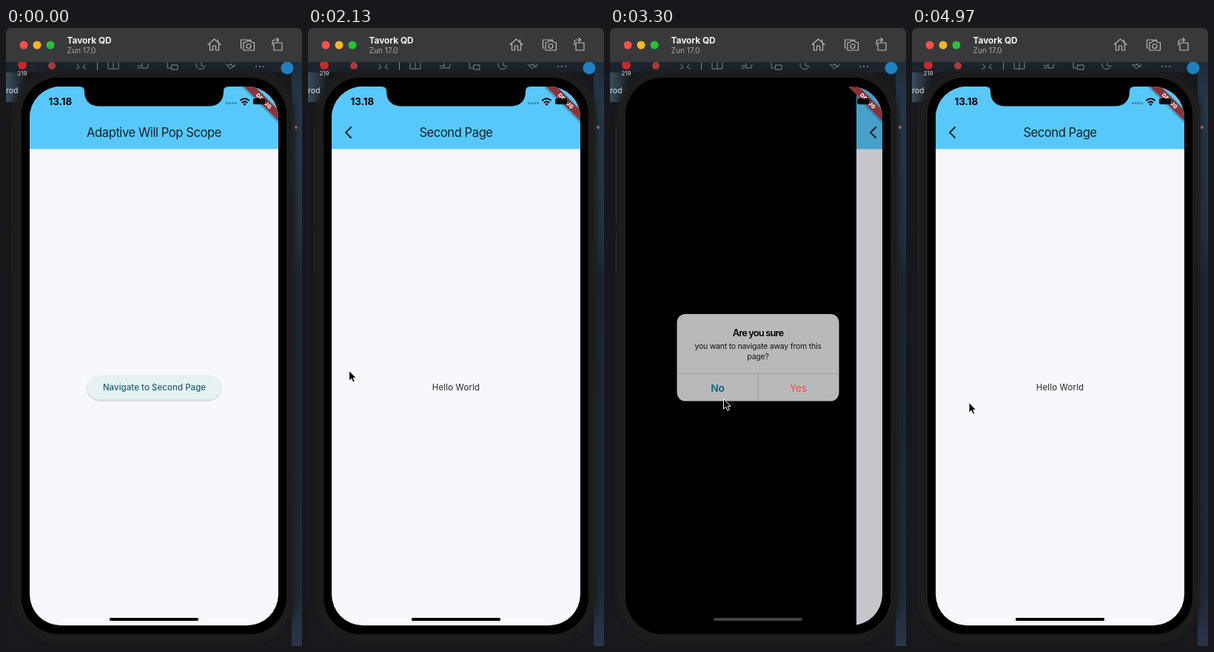
Animation of 400 by 834 pixels, one loop 5.01 s. Source, as an HTML page:

```html
<!DOCTYPE html>
<html lang="en">
<head>
<meta charset="utf-8">
<title>Second page back swipe</title>
<style>
  html, body { margin: 0; width: 100%; height: 100%; overflow: hidden; background: #17191c; }
  svg { display: block; width: 100vw; height: 100vh; font-family: Inter, "Open Sans", sans-serif; }
  .mid { text-anchor: middle; }
  .title { font-size: 16.6px; letter-spacing: -.45px; fill: #15222a; }
  .line { fill: none; stroke-linecap: round; stroke-linejoin: round; }
  .page { fill: #f7f8fc; }
  .bar { fill: #58c8fb; }
</style>
</head>
<body>
<svg viewBox="0 0 400 834">
  <defs>
    <clipPath id="screen"><rect x="32" y="79" width="336" height="727.200" rx="42"/></clipPath>
    <linearGradient id="rightEdge" x2="0" y2="1">
      <stop offset="0" stop-color="#1d2b38"/>
      <stop offset=".08" stop-color="#24394c"/>
      <stop offset=".3" stop-color="#223244"/>
      <stop offset=".37" stop-color="#1a2633"/>
      <stop offset=".9" stop-color="#1c2a38"/>
      <stop offset="1" stop-color="#2a3547"/>
    </linearGradient>
    <linearGradient id="leftEdge" x2="1" y2="0">
      <stop offset="0" stop-color="#3a4d5c"/>
      <stop offset="1" stop-color="#1a1e22"/>
    </linearGradient>
    <filter id="soft" x="-20%" y="-20%" width="140%" height="140%"><feGaussianBlur stdDeviation="3"/></filter>
    <filter id="lift" x="-10%" y="-20%" width="120%" height="160%">
      <feDropShadow dx="0" dy="1" stdDeviation=".8" flood-opacity=".3"/>
    </filter>
  </defs>

  <!-- desktop behind the simulator -->
  <rect width="400" height="834" fill="#17191c"/>
  <rect y="44" width="400" height="16" fill="#1b232c"/>
  <rect y="60" width="26" height="40" fill="url(#leftEdge)"/>
  <rect x="386" y="44" width="14" height="790" fill="url(#rightEdge)"/>
  <path d="M8.500 135V264M8.500 276V330" stroke="#2b2d30"/>
  <rect x="9" y="57" width="382" height="772" rx="60" fill="#1a1a1d" filter="url(#soft)"/>
  <circle cx="22" cy="50" r="6" fill="#c8282c"/>
  <circle cx="62" cy="51" r="5" fill="#a93a3c"/>
  <circle cx="380" cy="54" r="8.500" fill="#1f7fc0"/>
  <circle cx="392" cy="134" r="2.200" fill="#a0545a"/>
  <text class="mid" x="22" y="64" font-size="8" fill="#d4d6d8">219</text>
  <text y="88" font-size="10.500" fill="#dfe3e6">rod</text>
  <g class="line" stroke="#85888c">
    <path d="M95 55l4-2-3-4M108 55l-4-2 3-4M123.500 46v10M138 47v8h6l1 1 1-1h6v-8M145 47v7M178 51h5M178 54h4M184 48v6h7l1-5M218 47v7h4M224 50h8v6h-8zM257 48a6 6 0 0 0 12 3M264 47v4h3M297 49l6 6 7-6M299 50h4l1-2 2 4h3"/>
    <path d="M338 52h.1M343 52h.1M348 52h.1" stroke-width="2"/>
  </g>

  <!-- window title bar -->
  <path d="M0 46V8Q0 0 8 0H392Q400 0 400 8V46Z" fill="#39393c"/>
  <circle cx="24" cy="23" r="5.500" fill="#fb5149"/>
  <circle cx="42" cy="23" r="5.500" fill="#fdb524"/>
  <circle cx="60" cy="23" r="5.500" fill="#25c138"/>
  <text x="82.500" y="21" font-size="11.800" font-weight="700" fill="#f2f2f4">Tavork QD</text>
  <text x="82.500" y="34" font-size="10.200" fill="#a9a9ad">Zun 17.0</text>
  <g class="line" stroke="#b9b9bd" stroke-width="1.200">
    <path d="M273 22.500L281.500 15l8.500 7.500M275.500 21v9h4v-6h4v6h4v-9M286.500 16v3"/>
    <path d="M319 27h-1.500V16h13v2M321 19.500h3l1.500-2h5l1.500 2h3.500V30H321z"/>
    <circle cx="328" cy="24.500" r="3"/>
    <path d="M362 20h11v10h-11zM360 23v-4q0-3 3-3h5M366 13.500l2.500 2.500-2.500 2.500"/>
  </g>

  <!-- phone -->
  <rect x="21" y="67" width="358" height="751" rx="50"/>
  <g clip-path="url(#screen)">
    <rect x="32" y="79" width="336" height="728"/>
    <g id="first">
      <rect class="page" x="32" y="79" width="336" height="728"/>
      <rect class="bar" x="32" y="79" width="336" height="84.400"/>
      <text class="mid title" x="200" y="147">Adaptive Will Pop Scope</text>
      <rect x="110" y="469" width="180" height="32.500" rx="16.250" fill="#e6f1f4" filter="url(#lift)"/>
      <text class="mid" x="200.500" y="489" font-size="11.400" font-weight="500" letter-spacing=".1" fill="#1f6074">Navigate to Second Page</text>
    </g>
    <g id="second">
      <rect class="page" x="32" y="79" width="336" height="728"/>
      <rect class="bar" x="32" y="79" width="336" height="84.400"/>
      <path class="line" d="M58 134l-7 7 7 7" stroke="#10222b" stroke-width="2"/>
      <text class="mid title" x="200" y="147">Second Page</text>
      <text class="mid" x="200" y="489" font-size="11.400" letter-spacing=".2" fill="#242528">Hello World</text>
    </g>
    <rect id="barrier" x="32" y="79" width="336" height="728"/>
    <g id="dialog">
      <rect x="90.500" y="386" width="219" height="117.500" rx="11.500" fill="#b9b9bb"/>
      <path d="M90.500 466.500H309.500M200 466.500V503.500" stroke="#929294" stroke-width=".8"/>
      <g class="mid">
        <text x="200" y="416" font-size="12.800" font-weight="600" letter-spacing="-.8">Are you sure</text>
        <g font-size="10.500" letter-spacing="-.22" fill="#151517">
          <text x="200" y="433">you want to navigate away from this</text>
          <text x="200" y="447">page?</text>
        </g>
        <text x="145.500" y="490.500" font-size="13.600" font-weight="600" fill="#0f6478">No</text>
        <text x="254.500" y="490.500" font-size="13.400" fill="#f54b3c">Yes</text>
      </g>
    </g>
    <g transform="translate(348.500 98.500) rotate(45)">
      <rect x="-40" y="-4" width="80" height="10" fill="#000" opacity=".45" filter="url(#soft)"/>
      <rect x="-40" y="-5" width="80" height="10" fill="#8b3338"/>
      <text class="mid" y="2.700" font-size="7.200" font-weight="800" letter-spacing=".3" fill="#fff">DEBUG</text>
    </g>
  </g>

  <!-- status bar, notch and home indicator -->
  <path d="M99 79Q106 79 106 85Q106 105.500 127 105.500H273Q294 105.500 294 85Q294 79 301 79Z"/>
  <text x="57.500" y="104" font-size="13.300" font-weight="700">13.18</text>
  <path d="M297 101.500h3m1 0h3m1 0h3m1 0h3" stroke="#000" stroke-opacity=".28" stroke-width="3"/>
  <g class="line" stroke="#000" stroke-width="2">
    <path d="M317 97.500q5.500-4.500 11 0M319.500 100.500q3-2.500 6 0"/>
    <circle cx="322.500" cy="103" r=".6"/>
  </g>
  <rect x="334" y="95" width="16.500" height="8" rx="2.200"/>
  <rect x="351.300" y="97.500" width="1.200" height="3"/>
  <rect x="140" y="796" width="120" height="4" rx="2" fill="#414144"/>
  <clipPath id="onPage"><rect id="pageArea" y="790" width="336" height="17"/></clipPath>
  <rect x="140" y="796" width="120" height="4" rx="2" clip-path="url(#onPage)"/>

  <path id="cursor" d="M0 0V13.500L3.200 10.700 5.400 15.600 7.800 14.500 5.600 9.800H9.700Z" stroke="#fafafa" stroke-linejoin="round"/>
</svg>
<script>
const LOOP = 5010, STEP = 100 / 3, WIDTH = 336, DRAGGED = 301;
const el = id => document.getElementById(id);
const [first, second, barrier, dialog, pageArea, cursor] =
  ["first", "second", "barrier", "dialog", "pageArea", "cursor"].map(el);

const progress = (t, from, to) => Math.min(1, Math.max(0, (t - from) / (to - from)));
const smooth = u => u * u * (3 - 2 * u);
const easeOut = u => 1 - (1 - u) ** 3;

// each key: [time, ...values]
function track(keys, t, ease) {
  const i = keys.findIndex(key => key[0] > t);
  if (i === 0) return keys[0].slice(1);
  if (i < 0) return keys.at(-1).slice(1);
  const [start, ...a] = keys[i - 1], [end, ...b] = keys[i];
  const u = ease((t - start) / (end - start));
  return a.map((v, k) => v + (b[k] - v) * u);
}

const pointer = [
  [430, 406, 610], [830, 211, 485.5], [1300, 211, 485.5],
  [2000, 55.5, 462.5], [2200, 55.5, 462.5], [2360, 35, 462],
  [2480, 35, 462], [2840, 333, 448.5], [3010, 333, 448.5],
  [3280, 153.5, 500.5], [3600, 153.5, 500.5], [3940, 138.5, 490.5],
  [4200, 138.5, 490.5], [4850, 77, 505.5]
];
const drag = [[2780, 0], [2866, 68], [3000, DRAGGED]];

function pageOffset(t) {
  if (t < 2700) return WIDTH * (1 - easeOut(progress(t, 1080, 1580)));
  if (t < 3917) return track(drag, t, u => u)[0];
  return DRAGGED * (1 - easeOut(progress(t, 3917, 4397)));
}

function draw(t) {
  const dx = Math.round(pageOffset(t));
  const firstShown = t < 1600;
  first.style.display = firstShown ? "" : "none";
  first.setAttribute("transform", `translate(${(dx - WIDTH) / 3} 0)`);
  second.setAttribute("transform", `translate(${dx} 0)`);
  pageArea.setAttribute("x", firstShown ? 32 : 32 + dx);

  const opening = progress(t, 3000, 3200);
  const scale = 1.3 - 0.3 * easeOut(opening);
  barrier.setAttribute("opacity", 0.2 * opening * (1 - progress(t, 3900, 4120)));
  dialog.setAttribute("opacity", opening * (1 - progress(t, 3830, 3950)));
  dialog.setAttribute("transform", `translate(200 445) scale(${scale}) translate(-200 -445)`);

  const [x, y] = track(pointer, t, smooth);
  cursor.setAttribute("transform", `translate(${x} ${y})`);
}

const hold = t => Math.floor((t + 5) / STEP) * STEP;

const begin = performance.now();
function tick() {
  draw(hold((performance.now() - begin) % LOOP));
  requestAnimationFrame(tick);
}
tick();
</script>
</body>
</html>
```
